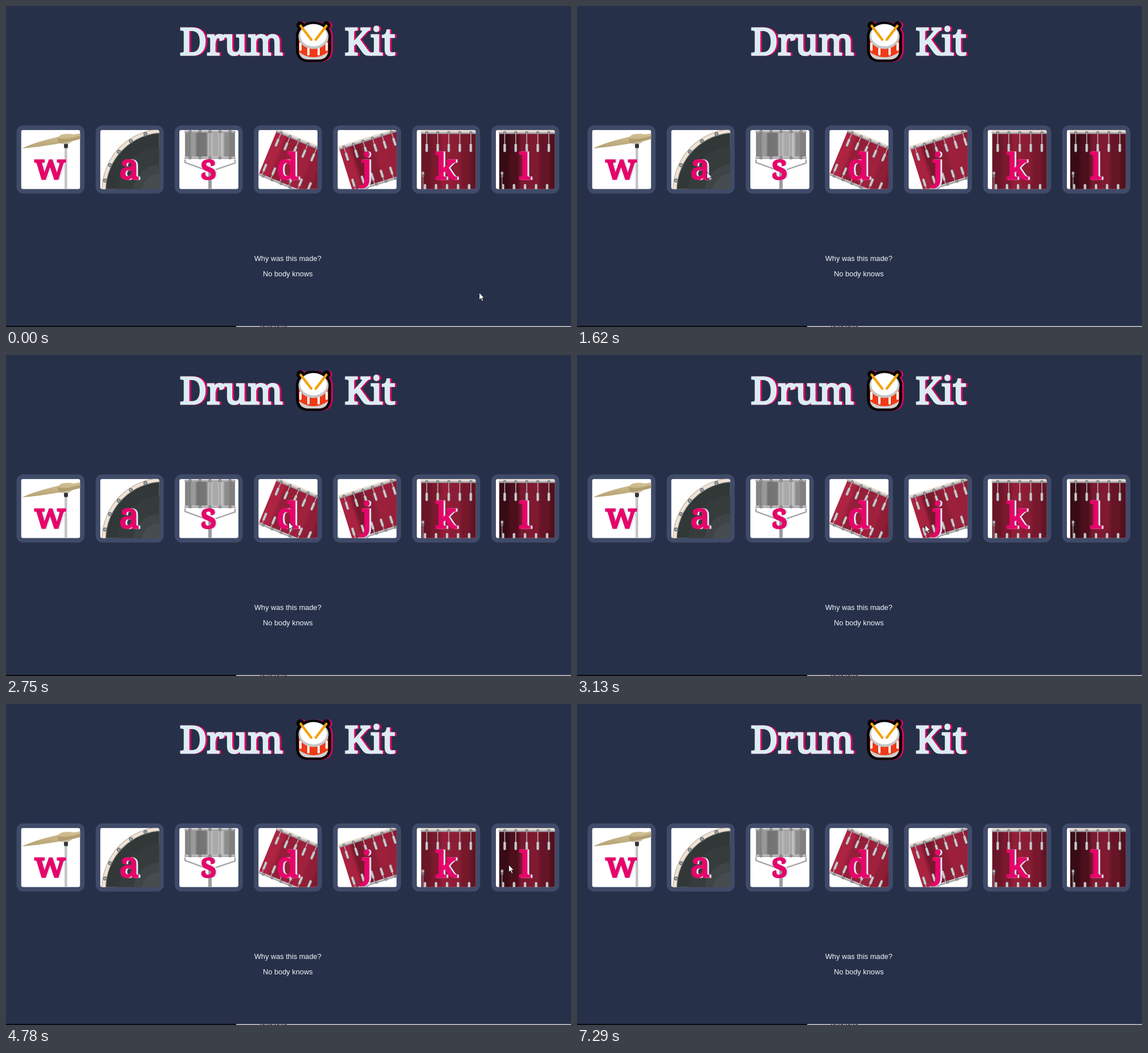
These frames come from a looping animation (994x564 px, 8.04 s). An HTML page:

```html
<!DOCTYPE html>
<html lang="en">
<head>
<meta charset="utf-8">
<title>Drum Kit</title>
<style>
  html, body { margin: 0; width: 100%; height: 100%; overflow: hidden; background: #273049; }
  svg { display: block; }
  .slab { font-family: "Noto Serif", serif; stroke-width: 3.2; }
  .title { font-size: 66px; letter-spacing: -.6px; fill: #dbedf3; stroke: #dbedf3; }
  .pink { filter: drop-shadow(3px 0 0 #da0463); }
  .key { font-size: 62px; text-anchor: middle; fill: #e6056a; stroke: #e6056a; filter: drop-shadow(3px 0 0 #dbedf3); }
  .note { font: 12.8px "Liberation Sans", Arial, sans-serif; text-anchor: middle; fill: #eef8fb; }
  .pressed { opacity: .5; filter: drop-shadow(0 3px 2px #dbedf3); }
</style>
</head>
<body>
<svg width="994" height="564" viewBox="0 0 994 564">
  <defs>
    <clipPath id="pad"><rect width="104" height="104" rx="4"/></clipPath>
    <clipPath id="shell"><path d="M515 52V76Q515 94 533 94H549Q567 94 567 76V52Z"/></clipPath>
    <linearGradient id="brass" x2="0" y2="1">
      <stop stop-color="#d3c195"/><stop offset="1" stop-color="#b5a173"/>
    </linearGradient>
  </defs>

  <text class="slab title pink" x="305.5" y="85.5">Drum</text>
  <text class="slab title pink" x="595.5" y="85.5">Kit</text>
  <g class="pink">
    <g fill="#050505">
      <path d="M510 50H572V76Q572 98.500 549 98.500H533Q510 98.500 510 76Z"/>
      <ellipse cx="541" cy="52" rx="31" ry="24.500"/>
      <circle cx="518" cy="34" r="7"/><circle cx="564" cy="34" r="7"/>
    </g>
    <g clip-path="url(#shell)">
      <rect x="514" y="52" width="54" height="44" fill="#f03a17"/>
      <path d="M514 80Q541 100 568 80V96H514Z" fill="#cfcfd1"/>
      <path d="M518 66V77M532 72V85M550 72V85M564 66V77" stroke="#fff" stroke-width="4" stroke-linecap="round"/>
    </g>
    <ellipse cx="541" cy="53.500" rx="26.500" ry="22" fill="#c5c6c8"/>
    <ellipse cx="541" cy="51.500" rx="23.500" ry="19.500" fill="#fff"/>
    <path d="M518.500 35L537 59M563.500 35L545 59" stroke="#f2a10c" stroke-width="4.500" stroke-linecap="round"/>
  </g>

  <g id="kit"></g>

  <text class="note" x="495.8" y="448">Why was this made?</text>
  <text class="note" x="495.8" y="475">No body knows</text>

  <rect y="562" width="405" height="2" fill="#0b0b0e"/>
  <rect x="405" y="562" width="589" height="1" fill="#8a8795"/>
  <rect x="405" y="563" width="589" height="1" fill="#cfc7cf"/>
  <path d="M447 563.3H495" stroke="#4c4850" stroke-width="1.4" stroke-dasharray="2 2 4 2 1 2"/>

  <path id="arrow" d="M.5 .5V13.5L3.4 10.8L5.6 15.6L7.7 14.7L5.6 10H9.4Z" fill="#fff" stroke="#15151b" stroke-width=".9"/>
  <circle id="halo" r="10" fill="#ffe000" opacity=".62"/>
</svg>
<script>
const LOOP = 8040, TICK = 125;
const $ = id => document.getElementById(id);
const times = (n, f) => Array.from({ length: n }, (_, i) => f(i)).join('');
const rect = (x, y, w, h, fill, rx = 0) =>
  `<rect x="${x}" y="${y}" width="${w}" height="${h}" rx="${rx}" fill="${fill}"/>`;
const line = (d, color, width) => `<path d="${d}" fill="none" stroke="${color}" stroke-width="${width}"/>`;
const ball = (x, y, r, fill) => `<circle cx="${x}" cy="${y}" r="${r}" fill="${fill}"/>`;

// A cylinder wall: even bands of the given lightness with soft seams.
let walls = 0;
function wall(w, h, hue, sat, lights) {
  const id = 'wall' + walls++, n = lights.length;
  const stops = lights.map((l, i) => [.2, .8].map(e =>
    `<stop offset="${(i + e) / n}" stop-color="hsl(${hue} ${sat}% ${l}%)"/>`).join('')).join('');
  return `<linearGradient id="${id}">${stops}</linearGradient>` + rect(0, 0, w, h, `url(#${id})`);
}

// A tension rod with its lug, pointing down (dir 1) or up (dir -1).
function lug(x, y, rod, dir) {
  const top = dir > 0 ? y + rod : y - rod - 15;
  return line(`M${x} ${y}v${dir * rod}`, '#b9b4b8', 1.5) +
    rect(x - 2.5, top, 5, 15, '#74666b', 2) + rect(x - 2, top, 3.8, 14.6, '#c9c7ca', 2);
}

function hoop(w, y, gap) {
  const n = Math.ceil(w / gap);
  return rect(-1, y - 2, w + 2, 4, '#a9a6a9', 1.5) + rect(-1, y - 2, w + 2, 1.3, '#d6d3d5') +
    times(n, i => ball(gap * (i + .5), y, 2.7, '#77777b') + ball(gap * (i + .5), y, 1.2, '#b5b5b9'));
}

function tom({ x, y, turn, w, h, gap, rod, lights }) {
  return `<g transform="translate(${x} ${y}) rotate(${turn})">` + wall(w, h, 347, 66, lights) +
    line(`M-1 -3.5H${w}`, '#e4cfb4', 1.4) + hoop(w, 0, gap) + hoop(w, h, gap) +
    times(Math.ceil(w / gap), i => lug(gap * (i + .5), 2, rod, 1) + lug(gap * (i + .5) - 3, h - 2, 5, -1)) + '</g>';
}

function floorTom(x, lights) {
  return tom({ x, y: 5, turn: 0, w: 112 - x, h: 112, gap: 19.4, rod: 17, lights }) +
    rect(9, 73, 4, 10, '#77757a', 1) + ball(11, 76, 2.3, '#b5b3b7') + line('M11 81V104', '#89868b', 1.5);
}

function cymbal() {
  return rect(76.8, 30, 4, 74, '#b0afb2') + rect(78, 30, 1.3, 74, '#d8d8db') +
    rect(75.5, 24, 7, 8, '#34343a', 2) +
    '<path d="M2 32.500Q22 22 66 12Q70 7 79 7Q88 6 92 8L104 6V16Q60 27 2 32.500Z" fill="url(#brass)"/>' +
    '<path d="M64 14Q78 19 104 10V16Q92 19 90 20Q84 26 77 25Q70 25 66 22Z" fill="#a08d5f" opacity=".55"/>';
}

function bass() {
  const cx = 112, cy = 107, r = 105;
  const rings = [[109.5, '#bfae9b'], [108.3, '#efe3d6'], [103, '#a5a19b'], [101.7, '#323838'], [78, '#363c3c'], [46, '#3f4546'], [29, '#474c4e']];
  return rings.map(([r, fill]) => ball(cx - (103 - Math.min(r, 103)) / 8, cy, r, fill)).join('') +
    times(6, i => {
      const a = (190 + i * 15.5) * Math.PI / 180;
      const x = cx + r * Math.cos(a), y = cy + r * Math.sin(a);
      return ball(x, y, 3.6, '#747a7b') + ball(x, y, 1.8, '#a9aeb0');
    });
}

function snare() {
  return rect(51, 70, 6, 34, '#9b9b9e') + line('M10 52V57L51 72H57L98 58V52', '#a5a5a9', 2.4) +
    '<g transform="translate(10 3)">' + wall(88, 47, 0, 0, [52, 60, 45, 46, 72, 66, 74, 55, 50]) +
    hoop(88, 0, 17.6) + hoop(88, 46, 17.6) + times(5, i => line(`M${8.8 + 17.6 * i} 3V44`, '#77777b', .8)) + '</g>';
}

const kit = {
  w: cymbal(),
  a: bass(),
  s: snare(),
  d: tom({ x: 32, y: 2, turn: 22.5, w: 112, h: 82, gap: 17, rod: 9, lights: [41, 35, 36, 38, 34, 30] }),
  j: tom({ x: 3, y: 33, turn: -17.5, w: 116, h: 79, gap: 17.5, rod: 8, lights: [40, 28, 33, 37, 36, 32] }),
  k: floorTom(8, [25, 29, 35, 33, 28, 23]),
  l: floorTom(6, [13, 18, 29, 30, 24, 19])
};

$('kit').innerHTML = Object.entries(kit).map(([key, art], i) =>
  `<g transform="translate(${18.5 + 139.2 * i} 209.8)"><g class="tile">` +
  rect(0, 0, 119.7, 119.6, '#404b69', 12) +
  `<g transform="translate(8 8)" clip-path="url(#pad)">${rect(0, 0, 104, 104, '#fff')}${art}</g>` +
  `<text class="slab key" x="59.3" y="94.2">${key}</text></g></g>`).join('');
const tiles = [...document.querySelectorAll('.tile')];

// Pointer stops: x, y, tick of arrival, tick of leaving.
const stops = [
  [832, 503, 0, 0],
  [97, 274, 5, 8], [228, 291, 12, 14], [368, 291, 16, 19], [497, 293, 22, 24],
  [612, 298, 25, 27], [757, 288, 30, 32], [884, 282, 38, 40],
  [912, 476, 44, 45], [966, 566, 50, 64]
];

function pointer(tick) {
  const i = stops.findLastIndex(s => s[2] <= tick);
  const [x, y, , leave] = stops[i];
  if (tick <= leave || i === stops.length - 1) return [x, y];
  const [nx, ny, arrive] = stops[i + 1];
  const p = 1 - (1 - (tick - leave) / (arrive - leave)) ** 2;
  return [x + (nx - x) * p, y + (ny - y) * p];
}

// Each tile is clicked one tick before the pointer leaves and stays pressed for the next.
function draw(t) {
  const tick = Math.floor(t / TICK);
  const [x, y] = pointer(tick);
  $('arrow').setAttribute('transform', `translate(${x} ${y})`);
  $('halo').setAttribute('transform', `translate(${x} ${y + 2})`);
  const leaving = tiles.map((_, i) => stops[i + 1][3]);
  $('halo').style.display = leaving.includes(tick + 1) ? '' : 'none';
  tiles.forEach((tile, i) => tile.classList.toggle('pressed', tick === leaving[i]));
}

const start = performance.now();
function run() {
  draw((performance.now() - start) % LOOP);
  requestAnimationFrame(run);
}
run();
</script>
</body>
</html>
```
